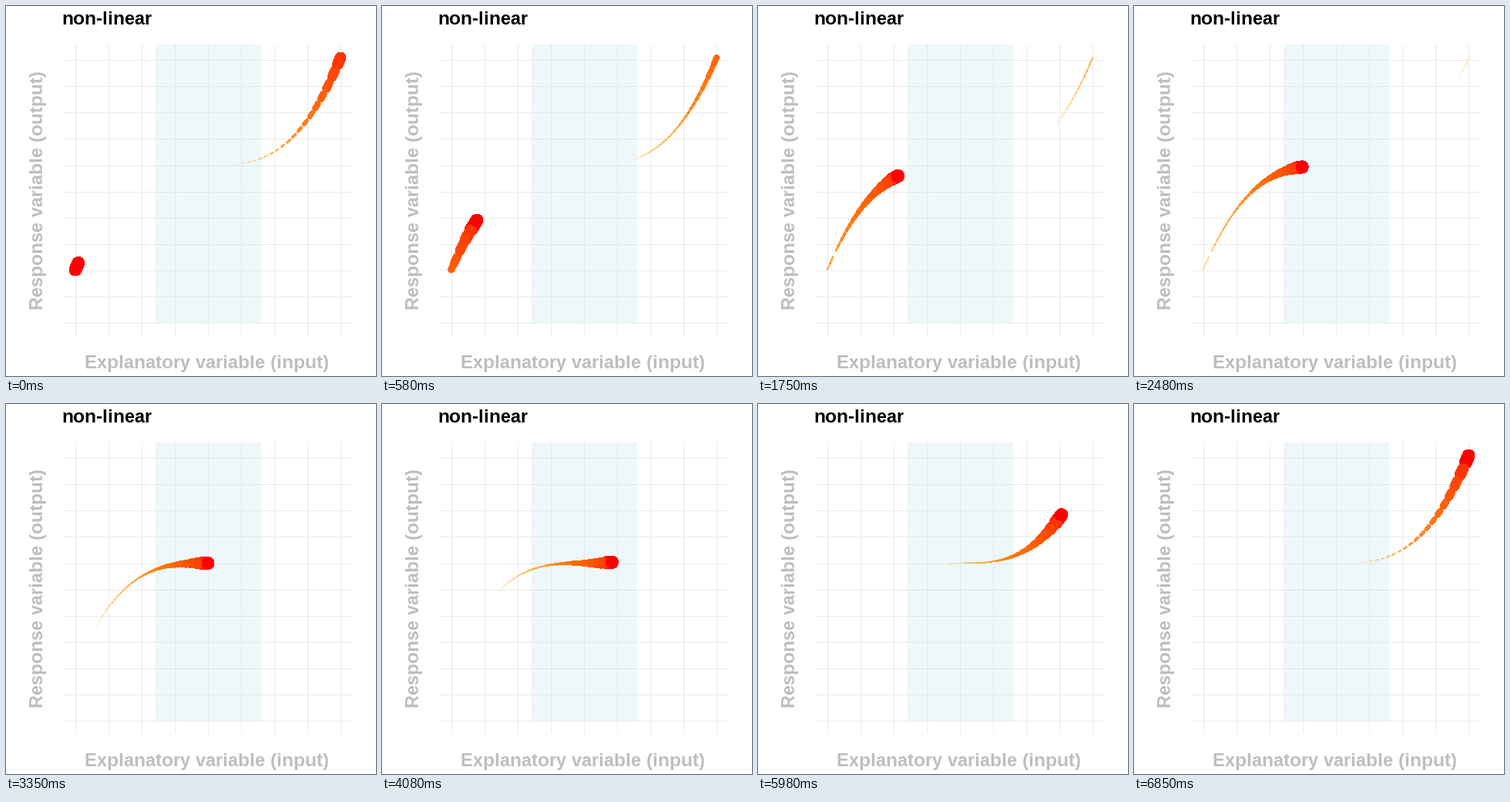
These frames come from a looping animation (480x480 px, 7000 ms). A matplotlib script:

```python
import matplotlib.pyplot as plt
from matplotlib.animation import FuncAnimation
from matplotlib.collections import LineCollection
from matplotlib.patches import Circle, Rectangle

SIZE = 480
LOOP_MS, TICK_MS = 7000, 50
STEPS = 48
WAKE = 19              # number of past steps in the trail
LEFT, RIGHT = 90, 434
MID_X, MID_Y = 262, 206.5
STRIDE = (RIGHT - LEFT) / (STEPS - 1)
WIDTH = 16
RED = (1, 0, 0)

plt.rcParams["font.family"] = "Liberation Sans"
plt.rcParams["font.weight"] = "bold"
# Whole-pixel glyph advances, as on screen.
plt.rcParams["text.hinting"] = "default"
plt.rcParams["text.hinting_factor"] = 1

# At 72 dpi one point is one pixel.
fig = plt.figure(figsize=(SIZE / 72, SIZE / 72), dpi=72, facecolor="white")
ax = fig.add_axes([0, 0, 1, 1])
ax.set_xlim(0, SIZE)
ax.set_ylim(SIZE, 0)
ax.axis("off")


def draw_backdrop():
    grid = dict(color="#ebebeb", lw=1, zorder=1, snap=False,
                solid_capstyle="butt")
    for i in range(9):
        x = LEFT + 43 * i + 0.5
        ax.plot([x, x], [50, 428], **grid)
    for i in range(11):
        y = round(411 - 34.08 * i) + 0.5
        ax.plot([73, 451], [y, y], **grid)
    ax.add_patch(Rectangle((194, 50), 137, 361, fc="#add8e6", alpha=0.2,
                           lw=0, zorder=2))
    ax.text(72, 24, "non-linear", size=24, color="black")
    ax.text(261, 470, "Explanatory variable (input)", size=24,
            color="#bebebe", ha="center", va="baseline")
    ax.text(48, 238.5, "Response variable (output)", size=24,
            color="#bebebe", rotation=90, rotation_mode="anchor",
            ha="center", va="baseline")


def point(x):
    """Point of the cubic curve at x, kept inside the data range."""
    x = min(max(x, LEFT), RIGHT)
    u = (x - MID_X) / (RIGHT - MID_X)
    height = 139.5 if u > 0 else 135.5
    return x, MID_Y - height * u ** 3


def head_x(step):
    return LEFT + STRIDE * (step + 0.5)


def wake_style(age):
    t = age / (WAKE + 1)
    colour = (1, 165 / 255 * t ** 0.38, 0, 1 - t ** 2)
    return colour, max(1, WIDTH * (1 - t) ** 3)


def wake_parts(step):
    """Yield the curve pieces of the wake, each step split at its middle."""
    for age in range(1, WAKE + 1):
        past = (step - age) % STEPS
        end = head_x(past)
        middle = end - STRIDE / 2
        yield age, end - STRIDE, middle
        # The first and last steps show a dashed wake.
        joined = 0 < step < STEPS - 1 and past != 1
        if joined and middle < RIGHT:
            yield age, middle, end


draw_backdrop()
trail = LineCollection([], capstyle="round", antialiaseds=False, zorder=3)
ax.add_collection(trail, autolim=False)
head = Circle((0, 0), WIDTH / 2, fc=RED, lw=0, antialiased=False, zorder=4)
ax.add_patch(head)


def update(tick):
    step = int((tick * TICK_MS + 45) * STEPS / LOOP_MS)
    x = head_x(step)
    segments = [[point(x - STRIDE), point(x)]]
    colours, widths = [RED + (1,)], [WIDTH]
    for age, start, end in wake_parts(step):
        colour, width = wake_style(age)
        segments.append([point(start), point(end)])
        colours.append(colour)
        widths.append(width)
    trail.set_segments(segments)
    trail.set_color(colours)
    trail.set_linewidth(widths)
    head.center = point(x)
    return trail, head


anim = FuncAnimation(fig, update, frames=LOOP_MS // TICK_MS, interval=TICK_MS,
                     init_func=lambda: update(0), repeat=True, repeat_delay=0)
plt.show()
```
